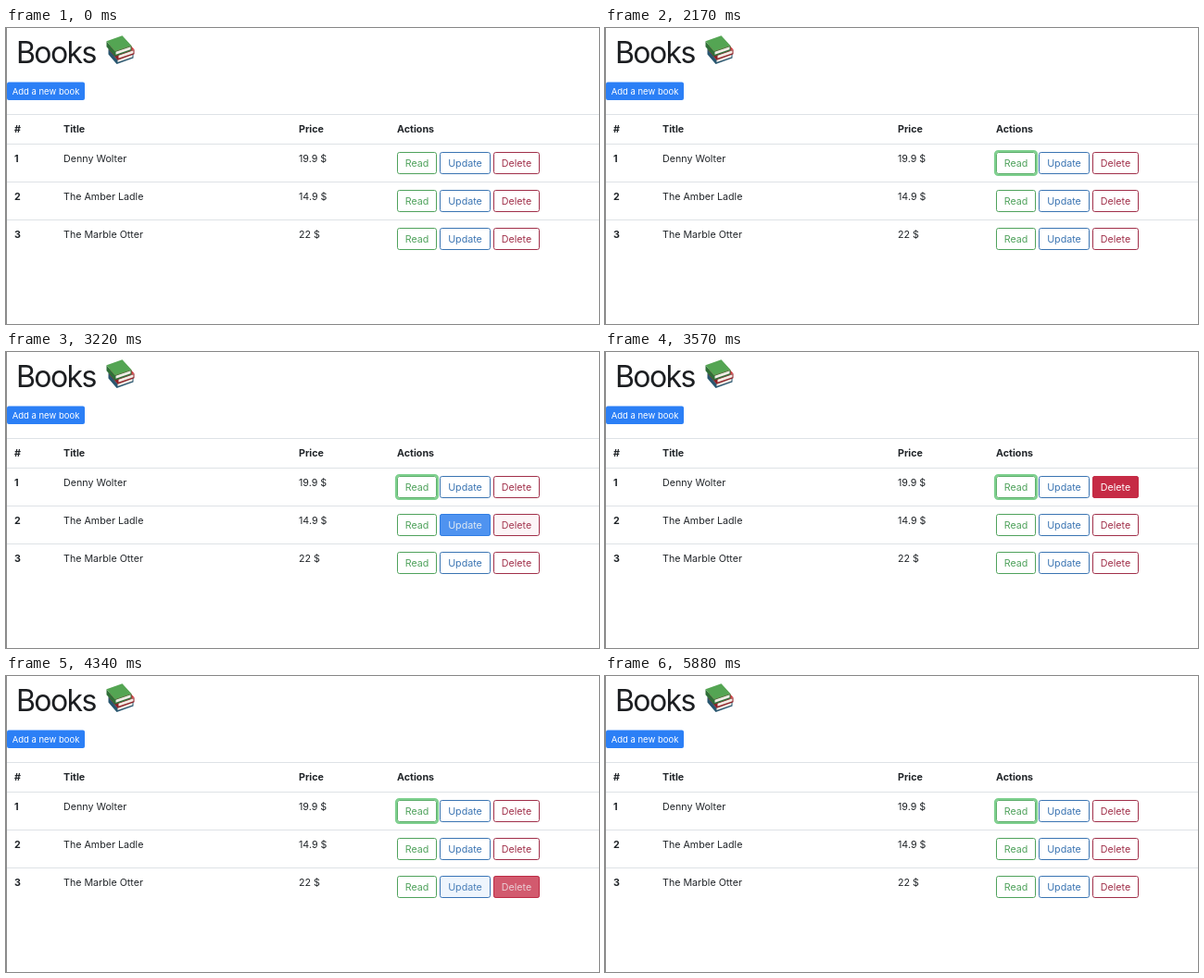
An HTML page for the animation above (6230 ms loop, 640 px wide and 320 px high).

```html
<!DOCTYPE html>
<html lang="en">
<head>
<meta charset="utf-8">
<title>Books</title>
<style>
  html, body { margin: 0; width: 100%; height: 100%; overflow: hidden; background: #fff; }
  svg { display: block; width: 640px; height: 320px; }
  text { font: 10.7px Inter, Roboto, sans-serif; fill: #212529; }
  .title { font-size: 32px; letter-spacing: -1.6px; fill: #1c1e21; }
  .bold { font-weight: 700; }
  .label { text-anchor: middle; }
  .add { font-size: 9.5px; fill: #fff; }
  .rule { stroke: #dee2e6; }
  .hover { opacity: 0; }
  .hover text { fill: #fff; }
  .ring { fill: none; stroke: #7fd08f; stroke-width: 2.4; opacity: 0; }
</style>
</head>
<body>
<svg id="stage" viewBox="0 0 640 320">
  <rect width="640" height="320" fill="#fff"/>
  <path d="M.5 0V320" stroke="#8a8a8a"/>
  <text class="title" x="11" y="38">Books</text>
  <g id="stack"></g>
  <rect x="1" y="58.5" width="84" height="19.5" rx="2" fill="#2b7ff6"/>
  <text class="label add" x="43" y="72">Add a new book</text>
  <g id="table"></g>
</svg>
<script>
const LOOP = 6230;
const FADE = 150;

const rows = [
  ['Denny Wolter', '19.9 $'],
  ['The Amber Ladle', '14.9 $'],
  ['The Marble Otter', '22 $']
];
const actions = [
  { label: 'Read', x: 422, width: 43, ink: '#4fa25c', fill: '#3fa352' },
  { label: 'Update', x: 468, width: 55, ink: '#3a74b2', fill: '#2f80ee' },
  { label: 'Delete', x: 526, width: 50, ink: '#a02f49', fill: '#c62b45' }
];

// Pointer visits per button: [enter, leave] in ms.
const visits = {
  Read1: [[1100, 1310]],
  Read3: [[2350, 2480]],
  Read2: [[2480, 2605]],
  Update1: [[2690, 2900]],
  Update2: [[2920, 3180]],
  Delete2: [[3200, 3420], [3660, 3860], [4890, 5100]],
  Delete1: [[3420, 3640], [5110, 5430]],
  Update3: [[3900, 4220]],
  Delete3: [[4240, 4840]]
};

const $ = id => document.getElementById(id);

function add(parent, tag, attrs, content = '') {
  const el = document.createElementNS('http://www.w3.org/2000/svg', tag);
  for (const key in attrs) el.setAttribute(key, attrs[key]);
  el.textContent = content;
  parent.append(el);
  return el;
}

const write = (x, y, content, cls = '') =>
  add($('table'), 'text', { x, y, class: cls }, content);

const rule = y => add($('table'), 'path', { class: 'rule', d: `M1 ${y}H640` });

function fade(el, spans) {
  const frames = [{ offset: 0, opacity: 0 }];
  const key = (time, opacity) =>
    frames.push({ offset: time / LOOP, opacity, easing: 'ease-in-out' });
  for (const [enter, leave] of spans) {
    key(enter, 0);
    key(enter + FADE, 1);
    if (leave < LOOP) {
      const end = Math.max(leave, enter + FADE);
      key(end, 1);
      key(end + FADE, 0);
    }
  }
  frames.push({ offset: 1, opacity: spans.at(-1)[1] < LOOP ? 0 : 1 });
  // Short visits can overlap a fade; offsets must stay ordered.
  frames.sort((a, b) => a.offset - b.offset);
  el.animate(frames, { duration: LOOP, iterations: Infinity });
}

function button({ label, x, width, ink, fill }, row) {
  const y = 134 + row * 41;
  const box = { x: x + .5, y: y + .5, width: width - 1, height: 23, rx: 2.2 };
  const caption = { x: x + width / 2, y: y + 16, class: 'label' };
  const group = add($('table'), 'g', {});
  add(group, 'rect', { ...box, fill: '#fff', stroke: ink });
  add(group, 'text', { ...caption, style: `fill:${ink}` }, label);

  const spans = visits[label + (row + 1)];
  if (spans) {
    const hover = add(group, 'g', { class: 'hover' });
    add(hover, 'rect', { ...box, fill, stroke: fill });
    add(hover, 'text', caption, label);
    fade(hover, spans);
  }
  if (label === 'Read' && row === 0) {
    const ring = add(group, 'rect', {
      class: 'ring', x: x - .9, y: y - .9, width: width + 1.8, height: 25.8, rx: 3.4
    });
    fade(ring, [[1190, LOOP]]);
  }
}

function book(x, y, cover, spine) {
  const shape = (d, fill) =>
    add($('stack'), 'path', { d, fill, transform: `translate(${x} ${y})` });
  shape('M0 6 9 17 27 11V16L9 22.5 0 12Z', spine);
  shape('M10 17.5 26 12V15L10 20.5Z', '#f1ece5');
  shape('M0 6 17 0 27 11 9 17Z', cover);
}

book(110.5, 16.5, '#3d84ad', '#28566f');
book(111.5, 12.2, '#d13a40', '#8f2026');
book(108.5, 8.3, '#54a553', '#2f6f37');

[93.5, 125.5, 166.5, 207.5].forEach(rule);
[['#', 9], ['Title', 62], ['Price', 316], ['Actions', 422]]
  .forEach(([content, x]) => write(x, 113, content, 'bold'));

rows.forEach(([title, price], i) => {
  const y = 145 + i * 41;
  write(9, y, i + 1, 'bold');
  write(62, y, title);
  write(316, y, price);
  actions.forEach(action => button(action, i));
});
</script>
</body>
</html>
```
